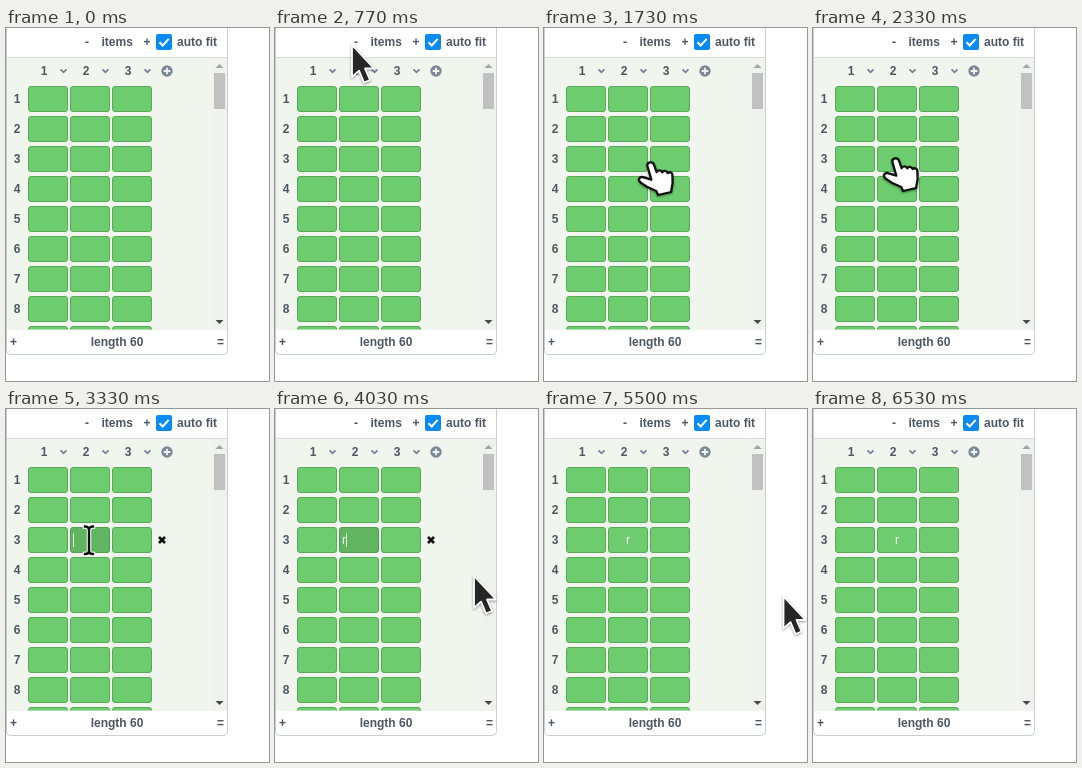
An HTML page that plays this animation: 263x353 px, repeating every 7260 ms.

```html
<!DOCTYPE html>
<html lang="en">
<head>
<meta charset="utf-8">
<title>Editable grid</title>
<style>
  html, body { margin: 0; width: 100%; height: 100%; overflow: hidden; background: #fff; }
  svg { display: block; }
  text { font: bold 12px "Liberation Sans", Arial, sans-serif; fill: #4d5763; }
  .mid { text-anchor: middle; }
  .cell { fill: #6dcc6d; stroke: #58a858; }
  .cell.active { fill: #61b561; stroke: #539c53; }
  .value { font-weight: normal; fill: #fff; }
  .chevron { fill: none; stroke: #718096; stroke-width: 1.7; }
  .hand { fill: #fff; stroke: #111; stroke-width: 2.3; stroke-linejoin: round; }
  .shadow { filter: drop-shadow(0 1px 1px rgba(0, 0, 0, .4)); }
</style>
</head>
<body>
<svg width="263" height="353" viewBox="0 0 263 353">
  <defs>
    <clipPath id="body-clip"><rect x="1" y="30" width="220" height="271.5"/></clipPath>
  </defs>

  <path d="M.5 0V322.5a4 4 0 0 0 4 4H217.5a4 4 0 0 0 4 -4V0" fill="#fff" stroke="#c9ced3"/>
  <rect x="1" y="29" width="220" height="273" fill="#f0f5ee"/>
  <path d="M1 29.5H221" stroke="#d5dbd6"/>

  <text class="mid" x="81" y="18">-</text>
  <text x="95.5" y="18">items</text>
  <text class="mid" x="141" y="18">+</text>
  <rect x="150" y="6" width="16" height="16" rx="2" fill="#098bf5"/>
  <path d="M153.5 14.3l3.2 3.2 6-6.7" fill="none" stroke="#fff" stroke-width="2"/>
  <text x="171" y="18">auto fit</text>

  <g id="grid" clip-path="url(#body-clip)"></g>

  <circle cx="161" cy="43" r="5.7" fill="#7d8997"/>
  <path d="M157.7 43h6.6M161 39.7v6.6" stroke="#f0f5ee" stroke-width="1.8"/>

  <rect x="206" y="30" width="15" height="271" fill="#eff2ed"/>
  <rect x="208" y="45" width="11" height="36" fill="#c1c1c1"/>
  <path d="M209.5 40l4-4 4 4z" fill="#a3a3a3"/>
  <path d="M209.5 292l4 4 4-4z" fill="#484848"/>

  <text class="mid" x="7.5" y="318">+</text>
  <text class="mid" x="111" y="318">length 60</text>
  <text class="mid" x="214.5" y="318">=</text>

  <text class="value" id="typed" x="67" y="135">r</text>
  <text class="value mid" id="saved" x="84" y="135">r</text>
  <path id="caret" d="M0 124.5V138" stroke="#e4f5e4"/>
  <path id="remove" d="M153 128l6 6m0-6l-6 6" stroke="#111" stroke-width="2.7"/>

  <g id="pointer">
    <path id="hand" class="hand shadow" d="M-3.6 4C-4.2 .2 1.6-1.2 3 2.6L5.6 10.2C6.8 7.6 10.3 7.8 11.2 10.4C12.6 8 15.8 8.4 16.6 11C18.8 9.2 21.4 10.8 21.4 13.6L21.6 20.5C21.6 23.5 20.4 25.5 20.2 30L7 33L5.3 29C.8 27.4-5.2 24.6-10 20.8C-14 17.6-11.2 14-7.4 15.4L.3 17.6Z"/>
    <g id="beam" fill="none" stroke-linecap="square">
      <path d="M-4-13.5Q0-13.5 0-10V11Q0 14 -4 14M4-13.5Q0-13.5 0-10V11Q0 14 4 14" stroke="#fff" stroke-width="4.5"/>
      <path d="M-4-13.5Q0-13.5 0-10V11Q0 14 -4 14M4-13.5Q0-13.5 0-10V11Q0 14 4 14" stroke="#111" stroke-width="2.4"/>
    </g>
    <path id="arrow" class="shadow" d="M0 0V32L7 25.7L12 37.5L18 35L13 23.5H22Z" fill="#262626" stroke="#fff" stroke-width="1.8" stroke-linejoin="round"/>
  </g>
</svg>
<script>
  const LOOP = 7260;
  const $ = id => document.getElementById(id);
  const show = (id, on) => $(id).setAttribute('visibility', on ? 'visible' : 'hidden');

  let markup = '';
  for (let col = 0; col < 3; col++) {
    const x = 22 + col * 42;
    markup += `<text class="mid" x="${x + 16}" y="47">${col + 1}</text>
      <path class="chevron" d="M${x + 32.5} 41.3l3 3 3-3"/>`;
    for (let row = 0; row < 9; row++) {
      markup += `<rect class="cell" id="cell${row}-${col}" x="${x + .5}" y="${58.5 + row * 30}" width="39" height="25" rx="2.5"/>`;
    }
  }
  for (let row = 0; row < 8; row++) {
    markup += `<text class="mid" x="11" y="${75 + row * 30}">${row + 1}</text>`;
  }
  $('grid').innerHTML = markup;
  const editedCell = $('cell2-1');

  // [start ms, shape, x, y]; each pose is held until the next one.
  const poses = [
    [0, ''],
    [730, 'arrow', 77, 17], [800, 'arrow', 96, 44], [870, 'hand', 110, 76],
    [930, 'hand', 119, 101], [1000, 'hand', 123, 115], [1100, 'hand', 122, 122],
    [1200, 'hand', 118, 127], [1300, 'hand', 116, 129],
    [1630, 'hand', 113, 131], [1730, 'hand', 107, 134], [1830, 'hand', 101, 135],
    [1930, 'hand', 95, 134], [2030, 'hand', 90, 132], [2130, 'hand', 86, 130],
    [2230, 'hand', 84, 128], [2330, 'hand', 83, 130],
    [2630, 'hand', 91, 133], [2800, 'hand', 84, 131],
    [3230, 'beam', 83, 131], [3430, 'beam', 88, 132], [3500, 'beam', 98, 135],
    [3570, 'hand', 119, 141], [3630, 'arrow', 152, 150], [3700, 'arrow', 180, 160],
    [3770, 'arrow', 194, 165], [3830, 'arrow', 199, 167],
    [4630, 'arrow', 201, 169], [4730, 'arrow', 203, 171],
    [4870, 'arrow', 208, 174], [4970, 'arrow', 219, 179], [5070, 'arrow', 231, 184],
    [5170, 'arrow', 237, 187], [5270, 'arrow', 239.5, 187.5],
    [6370, 'arrow', 232, 130], [6450, 'arrow', 203, 26], [6530, '']
  ];
  const caretSpans = [[3230, 3730], [4030, 4630], [5130, 5470]];

  function draw(t) {
    const within = (from, to) => t >= from && t < to;
    const [, shape, x = 0, y = 0] = poses.findLast(pose => pose[0] <= t);
    for (const id of ['hand', 'beam', 'arrow']) show(id, id === shape);
    $('pointer').setAttribute('transform', `translate(${x} ${y})`);

    const editing = within(3230, 5470);
    editedCell.classList.toggle('active', editing);
    show('remove', editing);
    show('typed', within(4030, 5470));
    show('saved', within(5500, LOOP));
    show('caret', caretSpans.some(span => within(...span)));
    $('caret').setAttribute('transform', `translate(${t < 4030 ? 67.5 : 71.5} 0)`);
  }

  const start = performance.now();
  function tick() {
    draw((performance.now() - start) % LOOP);
    requestAnimationFrame(tick);
  }
  tick();
</script>
</body>
</html>
```
